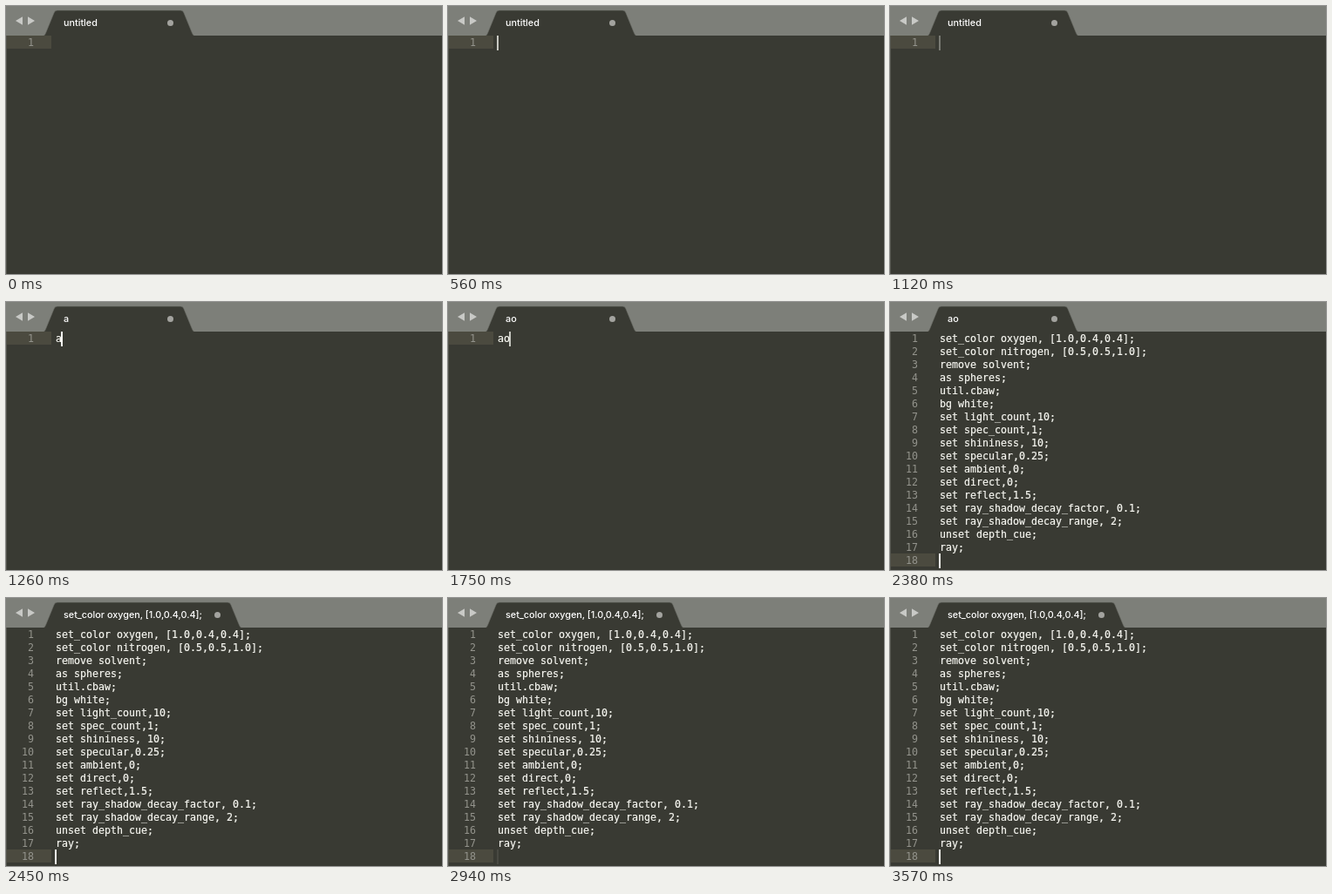
Recreate the animation shown at these times as an HTML page. Size 500 by 308 pixels, loop 3710 ms.

```html
<!DOCTYPE html>
<html lang="en">
<head>
<meta charset="utf-8">
<title>Editor</title>
<style>
  html, body { margin: 0; width: 100%; height: 100%; overflow: hidden; background: #393a33; }
  svg { display: block; width: 100%; height: 100%; }
  .code { font: 11.63px "DejaVu Sans Mono", monospace; }
  #lines { fill: #f8f8f2; stroke: #f8f8f2; stroke-width: .2px; }
  #numbers { fill: #93938c; text-anchor: end; }
  #title { font: 500 10.8px Inter, sans-serif; fill: #fff; }
</style>
</head>
<body>
<svg viewBox="0 0 500 308" xmlns="http://www.w3.org/2000/svg">
  <rect width="500" height="308" fill="#393a33"/>
  <rect width="500" height="34" fill="#7d7f79"/>
  <path d="M11 17L19 12.3V21.7ZM33 17L25 12.3V21.7Z" fill="#c8c9c6"/>
  <path id="tab" fill="#393a33" stroke="#6d6f69" stroke-width=".6"/>
  <rect y="34" width="500" height="2" fill="#393a33"/>
  <text id="title" x="66" y="23"></text>
  <circle id="dot" cy="19.5" r="3.5" fill="#a3a39f"/>
  <rect id="active" width="52" height="15" fill="#4b4a3f"/>
  <rect y="34" width="1" height="274" fill="#55564f"/>
  <g id="numbers" class="code"></g>
  <g id="lines" class="code"></g>
  <rect id="caret" width="2" height="17" fill="#f8f8f2"/>
</svg>
<script>
const LOOP = 3710, STEP = 70, TOP = 34, LEFT = 57, ADVANCE = 7, LINE = 15;

const script = `set_color oxygen, [1.0,0.4,0.4];
set_color nitrogen, [0.5,0.5,1.0];
remove solvent;
as spheres;
util.cbaw;
bg white;
set light_count,10;
set spec_count,1;
set shininess, 10;
set specular,0.25;
set ambient,0;
set direct,0;
set reflect,1.5;
set ray_shadow_decay_factor, 0.1;
set ray_shadow_decay_range, 2;
unset depth_cue;
ray;
`;

// [start, value]
const texts = [[0, ""], [1190, "a"], [1400, "ao"], [2380, script]];
const titles = [[0, "untitled"], [1260, "a"], [1400, "ao"], [2450, script.split("\n")[0]]];

// [first step, last step, final opacity]
const fades = [
  [70, 140, 1], [560, 770, 0], [1120, 1260, 1], [1190, 1190, 1],
  [1750, 1960, 0], [2380, 2380, 1], [2800, 2940, .08], [3430, 3570, 1]
];

const el = id => document.getElementById(id);
const latest = (list, t) => list.filter(([start]) => start <= t).pop()[1];

function put(node, attrs) {
  for (const key in attrs) node.setAttribute(key, attrs[key]);
}

function caretOpacity(t) {
  let value = 0;
  for (const [start, end, to] of fades) {
    if (t < start) break;
    const progress = Math.min(1, (t - start + STEP) / (end - start + STEP));
    value += (to - value) * progress;
  }
  return value;
}

function addText(parent, x, row, content) {
  const node = document.createElementNS("http://www.w3.org/2000/svg", "text");
  put(node, { x, y: TOP + 12 + row * LINE });
  node.textContent = content;
  parent.append(node);
}

let shownText = null, shownTitle = null;

function showText(text) {
  if (text === shownText) return;
  shownText = text;
  const rows = text.split("\n"), last = rows.length - 1;
  el("numbers").replaceChildren();
  el("lines").replaceChildren();
  rows.forEach((content, row) => {
    addText(el("numbers"), 32, row, row + 1);
    addText(el("lines"), LEFT, row, content);
  });
  const y = TOP + last * LINE;
  put(el("active"), { y });
  put(el("caret"), { x: LEFT - 1 + rows[last].length * ADVANCE, y });
}

function showTitle(title) {
  if (title === shownTitle) return;
  shownTitle = title;
  el("title").textContent = title;
  const right = title.length > 20 ? 270 : 216;
  put(el("tab"), {
    d: `M43 34.5Q45 33 46 30L55 8Q56 5 59 5H${right - 16}Q${right - 13} 5 ${right - 12} 8` +
       `L${right - 3} 30Q${right - 2} 33 ${right} 34.5Z`
  });
  put(el("dot"), { cx: right - 27.5 });
}

function draw(now) {
  const t = Math.floor(now % LOOP / STEP) * STEP;
  showText(latest(texts, t));
  showTitle(latest(titles, t));
  put(el("caret"), { opacity: caretOpacity(t) });
}

const begin = performance.now();
function tick() {
  draw(performance.now() - begin);
  requestAnimationFrame(tick);
}
tick();
</script>
</body>
</html>
```
